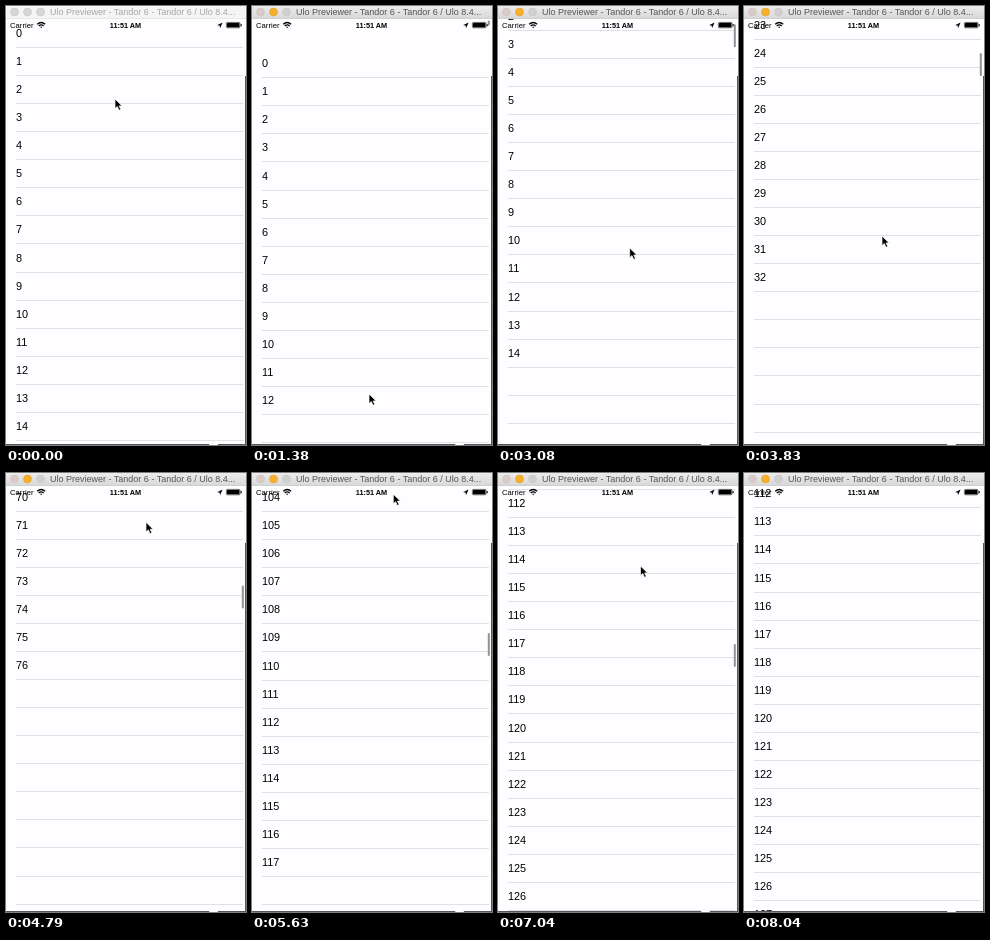
Animation, 240 px wide and 439 px high, one loop 9.18 s. Source, as an HTML page:

```html
<!DOCTYPE html>
<html lang="en">
<head>
<meta charset="utf-8">
<title>List scrolling</title>
<style>
  html, body { margin: 0; width: 100%; height: 100%; overflow: hidden; background: #fff; }
  svg { display: block; width: 100vw; height: 100vh; }
  text { font-family: "Liberation Sans", Arial, sans-serif; }
  .row text { font-size: 10.9px; }
  .row line { stroke: #e1e0e4; }
</style>
</head>
<body>
<svg viewBox="0 0 240 439" xmlns="http://www.w3.org/2000/svg">
  <defs>
    <clipPath id="screen"><rect y="12.5" width="240" height="426"/></clipPath>
    <linearGradient id="chrome" x2="0" y2="1">
      <stop offset="0" stop-color="#ececec"/>
      <stop offset="1" stop-color="#d8d8d8"/>
    </linearGradient>
  </defs>
  <rect width="240" height="439" fill="#fefdff"/>
  <g id="rows" clip-path="url(#screen)"></g>

  <text x="4" y="22" font-size="7.7">Carrier</text>
  <g fill="none" stroke="#000" stroke-width="1.2">
    <path d="M31.2 18.3Q35.2 14.7 39.2 18.3M32.7 20Q35.2 17.8 37.7 20"/>
    <path d="M34.1 20.8L35.2 22.2L36.3 20.8Z" fill="#000" stroke="none"/>
  </g>
  <text x="119.5" y="22" font-size="7.3" font-weight="bold" text-anchor="middle">11:51 AM</text>
  <path d="M211 19.3L216.6 16.6L214 22.2L213.7 19.5Z"/>
  <rect x="220.4" y="16.4" width="13.6" height="5.4" rx="1" fill="none" stroke="#000" stroke-width=".6"/>
  <rect x="221" y="16.9" width="12.4" height="4.4" rx=".5"/>
  <rect x="234.6" y="18" width="1.1" height="2.2" rx=".5"/>

  <rect id="thumb" x="235.8" width="2" rx="1" fill="#929294"/>
  <rect x="239" y="70" width="1" height="369" fill="#55555a"/>
  <rect y="438" width="240" height="1" fill="#55555a"/>
  <rect x="203" y="437.3" width="9" height="1.7" rx=".8" fill="#fff"/>

  <rect id="bar" width="240" height="12.5"/>
  <rect id="edge" y="12" width="240" height=".6"/>
  <g id="lights" stroke-width=".5">
    <circle cx="8.5" cy="6" r="4"/>
    <circle cx="21.5" cy="6" r="4"/>
    <circle cx="34.5" cy="6" r="4"/>
  </g>
  <text id="title" x="44" y="9.3" font-size="9">Ulo Previewer - Tandor 6 - Tandor 6 / Ulo 8.4...</text>
  <path id="cursor" d="M0 0V9.6L2.3 7.5L4 11.3L5.8 10.5L4.1 6.9H7.1Z" stroke="#fff" stroke-width=".7"/>
</svg>
<script>
const LOOP = 9180, ROW = 28.07, FIRST = 27, BOTTOM = 438, VIEW = 427;
const TAU = 517, SPRING = .0102, LOAD_DELAY = 100, ACTIVE_AT = 630;
const NS = "http://www.w3.org/2000/svg";
const byId = id => document.getElementById(id);
const set = (el, attrs) => { for (const k in attrs) el.setAttribute(k, attrs[k]); };
const clamp = (v, a, b) => Math.min(b, Math.max(a, v));

// Pointer path: time, x, y
const path = [
  [0, 109, 93], [40, 109, 93], [290, 108, 61], [630, 108, 61],
  [1120, 117, 388], [1380, 117, 388], [1900, 116, 66], [1950, 116, 66],
  [2460, 117, 416], [2500, 117, 416], [3000, 130, 320], [3220, 134, 100],
  [3680, 138, 414], [3730, 138, 394], [3830, 138, 232], [3900, 138, 60],
  [4560, 140, 400], [4690, 140, 294], [4790, 140, 49.5], [5400, 141, 7],
  [6380, 142, 108], [6800, 142, 108], [7900, 146, -14], [9180, 146, -14]
];

// Scroll phases: start time, kind, offset at start, release speed in px/ms
const phases = [
  [0, "hold", 0], [630, "drag", 0], [1120, "bounce", -118.3],
  [1950, "drag", 0], [2500, "bounce", -124],
  [3000, "drag", -4.6], [3220, "glide", 215, .837],
  [3680, "drag", 470], [3900, "glide", 824, 2.12],
  [4560, "drag", 1615.5], [4790, "glide", 1966, 2.302],
  [7550, "hold", 3150.5]
];

const lastBefore = (list, t) => {
  let i = list.length - 1;
  while (i > 0 && list[i][0] > t) i--;
  return i;
};

const slope = (i, k) => (path[i + 1][k] - path[i][k]) / (path[i + 1][0] - path[i][0]);

// Monotone tangent, so the pointer never overshoots a key
function tangent(i, k) {
  if (i === 0 || i === path.length - 1) return 0;
  const a = slope(i - 1, k), b = slope(i, k);
  return a * b > 0 ? 2 * a * b / (a + b) : 0;
}

function pointer(t, k) {
  const i = Math.min(lastBefore(path, t), path.length - 2);
  const a = path[i], b = path[i + 1], d = b[0] - a[0];
  const u = clamp((t - a[0]) / d, 0, 1), w = 1 - u;
  return w * w * (1 + 2 * u) * a[k] + u * u * (3 - 2 * u) * b[k]
    + d * u * w * (w * tangent(i, k) - u * tangent(i + 1, k));
}

function scrollAt(t) {
  const [start, kind, from, speed] = phases[lastBefore(phases, t)];
  const dt = t - start;
  if (kind === "glide") return from + speed * TAU * (1 - Math.exp(-dt / TAU));
  if (kind === "bounce") return from * (1 + SPRING * dt) * Math.exp(-SPRING * dt);
  if (kind === "hold") return from;
  const raw = from + pointer(start, 2) - pointer(t, 2);
  return raw < 0 && start < 3000 ? -VIEW * (1 - 1 / (1 - raw * .5 / VIEW)) : raw;
}

const rows = Array.from({ length: 18 }, () => {
  const g = document.createElementNS(NS, "g");
  const label = document.createElementNS(NS, "text");
  const line = document.createElementNS(NS, "line");
  g.setAttribute("class", "row");
  set(label, { x: 10, y: 4 });
  set(line, { x1: 10, x2: 237, y1: 14.5, y2: 14.5 });
  g.append(label, line);
  byId("rows").append(g);
  return { g, label };
});

function drawRows(t, offset) {
  const first = Math.max(0, Math.floor((offset - FIRST) / ROW));
  const earlier = scrollAt(Math.max(0, t - LOAD_DELAY));
  rows.forEach(({ g, label }, i) => {
    const n = first + i, y = FIRST + n * ROW;
    set(g, { transform: `translate(0 ${Math.round(y - offset)})` });
    // Labels load shortly after a row enters from below
    label.textContent = y - ROW / 2 - earlier < BOTTOM ? n : "";
  });
}

function drawChrome(active) {
  const fills = active ? ["#dccac7", "#f8b02c", "#d0d0d0"] : ["#d6d6d6", "#d6d6d6", "#d6d6d6"];
  [...byId("lights").children].forEach((c, i) =>
    set(c, { fill: fills[i], stroke: active && i === 1 ? "#dd9a25" : "#c3c3c3" }));
  set(byId("bar"), { fill: active ? "url(#chrome)" : "#f5f5f5" });
  set(byId("edge"), { fill: active ? "#bcbcbc" : "#dedede" });
  set(byId("title"), { fill: active ? "#555" : "#a6a6a6" });
}

function draw(t) {
  const offset = scrollAt(t);
  drawRows(t, offset);
  drawChrome(t >= ACTIVE_AT);
  set(byId("thumb"), {
    y: 14.5 + .0498 * Math.max(0, offset),
    height: Math.max(5, 23 + Math.min(0, offset)),
    opacity: t < ACTIVE_AT ? 0 : clamp((8000 - t) / 300, 0, 1)
  });
  set(byId("cursor"), { transform: `translate(${pointer(t, 1)} ${pointer(t, 2)})` });
}

const began = performance.now();
function tick() {
  draw((performance.now() - began) % LOOP);
  requestAnimationFrame(tick);
}
tick();
</script>
</body>
</html>
```
